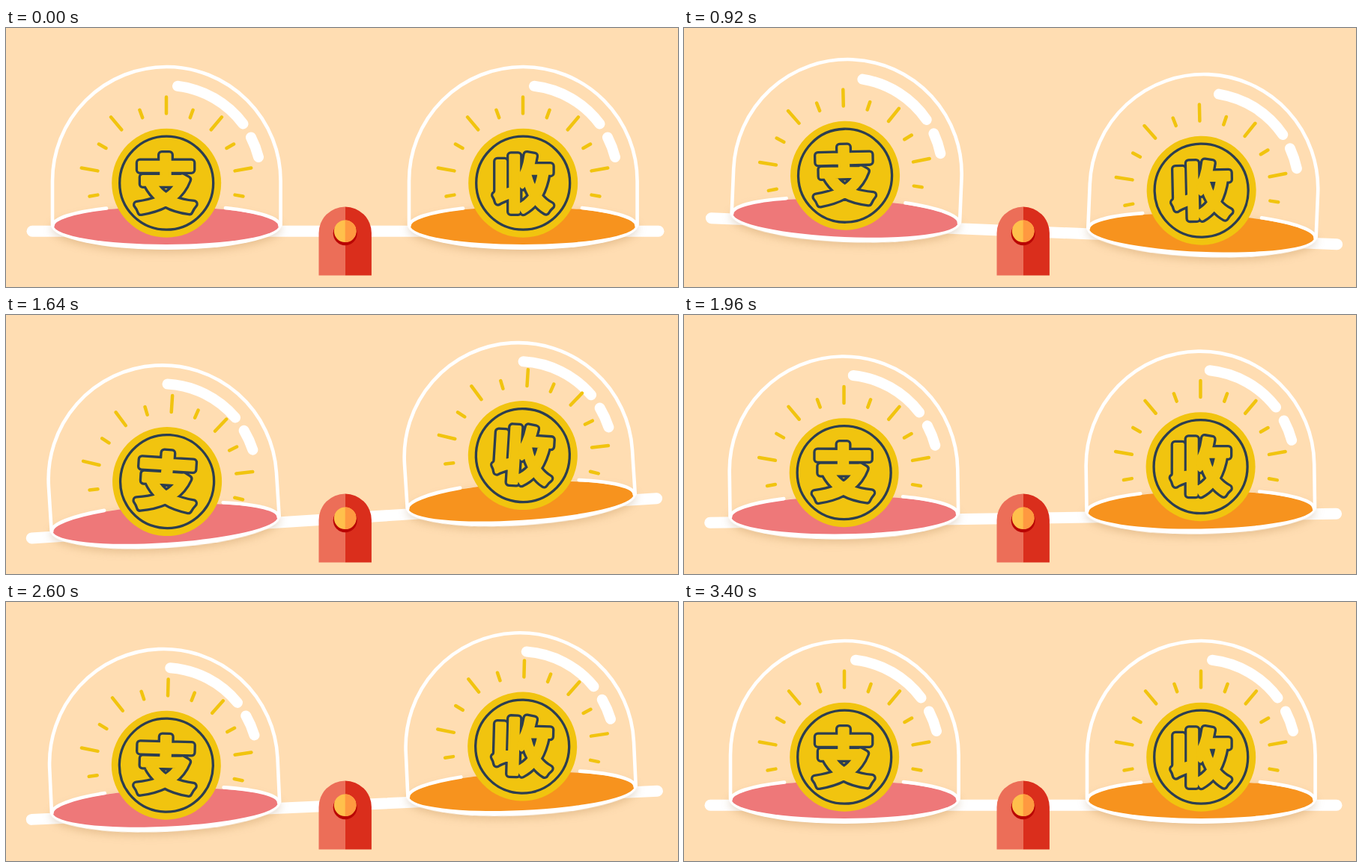
Animation of 897 by 347 pixels, one loop 3.76 s. Source, as an HTML page:

```html
<!DOCTYPE html>
<html lang="zh">
<head>
<meta charset="utf-8">
<title>收支</title>
<style>
  html, body { margin: 0; height: 100%; overflow: hidden; background: #ffddb2; }
  svg { display: block; width: 100%; height: 100%; }
  .line { fill: none; stroke: #fff; stroke-linecap: round; stroke-width: 4.6; }
  .bar { stroke-width: 15; }
  .shine { stroke-width: 14; }
  .rim { fill: #fff; filter: drop-shadow(0 4px 6px rgba(130, 70, 0, .2)); }
  .rays { fill: none; stroke: #f1c40f; stroke-width: 4.5; stroke-linecap: round; }
  .disc { fill: #f1c40f; }
  .ring { fill: none; stroke: #2c3e50; stroke-width: 3.3; }
  text {
    font: 700 80px "Noto Sans CJK SC", "Noto Sans CJK JP", sans-serif;
    text-anchor: middle; fill: #f1c40f; paint-order: stroke;
    stroke: #f1c40f; stroke-width: 5.4; stroke-linejoin: round;
  }
  .edge { stroke: #2c3e50; stroke-width: 12; }
</style>
</head>
<body>
<svg viewBox="0 0 897 347">
  <g id="beam"><path class="line bar" d="M35 272.3H871"/></g>
  <path fill="#ec6e58" d="M417.5 331.6V274.7a35.2 35.2 0 0 1 35.2-35.2V331.6z"/>
  <path fill="#da2e1c" d="M452.7 239.5a35.2 35.2 0 0 1 35.2 35.2V331.6h-35.2z"/>
  <circle cx="452.7" cy="275.3" r="16" fill="#b90504"/>
  <circle cx="452.7" cy="272.3" r="14.8" fill="#ffc04c"/>
  <path fill="#ff9940" d="M452.7 257.5a14.8 14.8 0 0 1 0 29.6z"/>
</svg>
<script>
const LOOP = 3760, STEP = 40;
const beam = document.getElementById('beam');

// Eleven rays, 20 degrees apart, alternately long and short.
let rays = '';
for (let k = -5; k <= 5; k++) {
  const a = k * Math.PI / 9;
  const point = r => `${214 + r * Math.sin(a)} ${207.5 - r * Math.cos(a)}`;
  rays += `M${point(93)}L${point(k % 2 ? 104 : 115)}`;
}

const unit = (x, color, sign) => `
  <g transform="translate(${x})">
    <path class="rim" d="M60 264A154 33 0 0 0 368 264A154 24 0 0 0 60 264z"/>
    <ellipse cx="214" cy="264.7" rx="150.5" ry="25.2" fill="${color}"/>
    <path class="line" d="M62.5 265A151.5 27.5 0 0 1 134 241.5M293 241A151.5 27.5 0 0 1 365.5 265"/>
    <path class="line" d="M62 264V205A152.3 153 0 0 1 366.6 205V264"/>
    <path class="line shine" d="M229 77.8A128 128 0 0 1 316.5 128.5M327 146.5A128 128 0 0 1 337 173"/>
    <g class="coin">
      <path class="rays" d="${rays}"/>
      <circle class="disc" cx="214.2" cy="207.7" r="73"/>
      <circle class="ring" cx="214.2" cy="207.7" r="62.5"/>
      <text class="edge" x="213.3" y="237.5">${sign}</text>
      <text x="213.3" y="237.5" aria-hidden="true">${sign}</text>
    </g>
  </g>`;
beam.insertAdjacentHTML('beforeend', unit(0, '#ee7879', '支') + unit(476, '#f7931e', '收'));
const coins = beam.querySelectorAll('.coin');

// Turning points of the swing: ms, beam tilt, coin sway against the beam.
const turns = [
  [0, 0, 0], [690, 4.1, -6.8], [1460, -4.2, 8.5],
  [2330, 1.27, -3.9], [2655, -2.9, 4.7], [3400, 0, 0]
];

// Half cosine waves join the turning points; the beam rests after the last.
function swing(t) {
  const i = turns.findIndex(p => p[0] > t);
  if (i < 0) return [0, 0];
  const from = turns[i - 1], to = turns[i];
  const part = (t - from[0]) / (to[0] - from[0]);
  const ease = (1 - Math.cos(Math.PI * part)) / 2;
  return [1, 2].map(n => from[n] + (to[n] - from[n]) * ease);
}

function draw(now) {
  const [tilt, sway] = swing(Math.floor(now % LOOP / STEP) * STEP);
  beam.setAttribute('transform', `rotate(${tilt} 453 297)`);
  // The right coin hops a little while its side is up.
  coins.forEach((coin, i) => coin.setAttribute('transform',
    `translate(0 ${i * 1.3 * Math.min(0, tilt)}) rotate(${sway} 214 256)`));
}

const start = performance.now();
function frame() {
  draw(performance.now() - start);
  requestAnimationFrame(frame);
}
frame();
</script>
</body>
</html>
```
